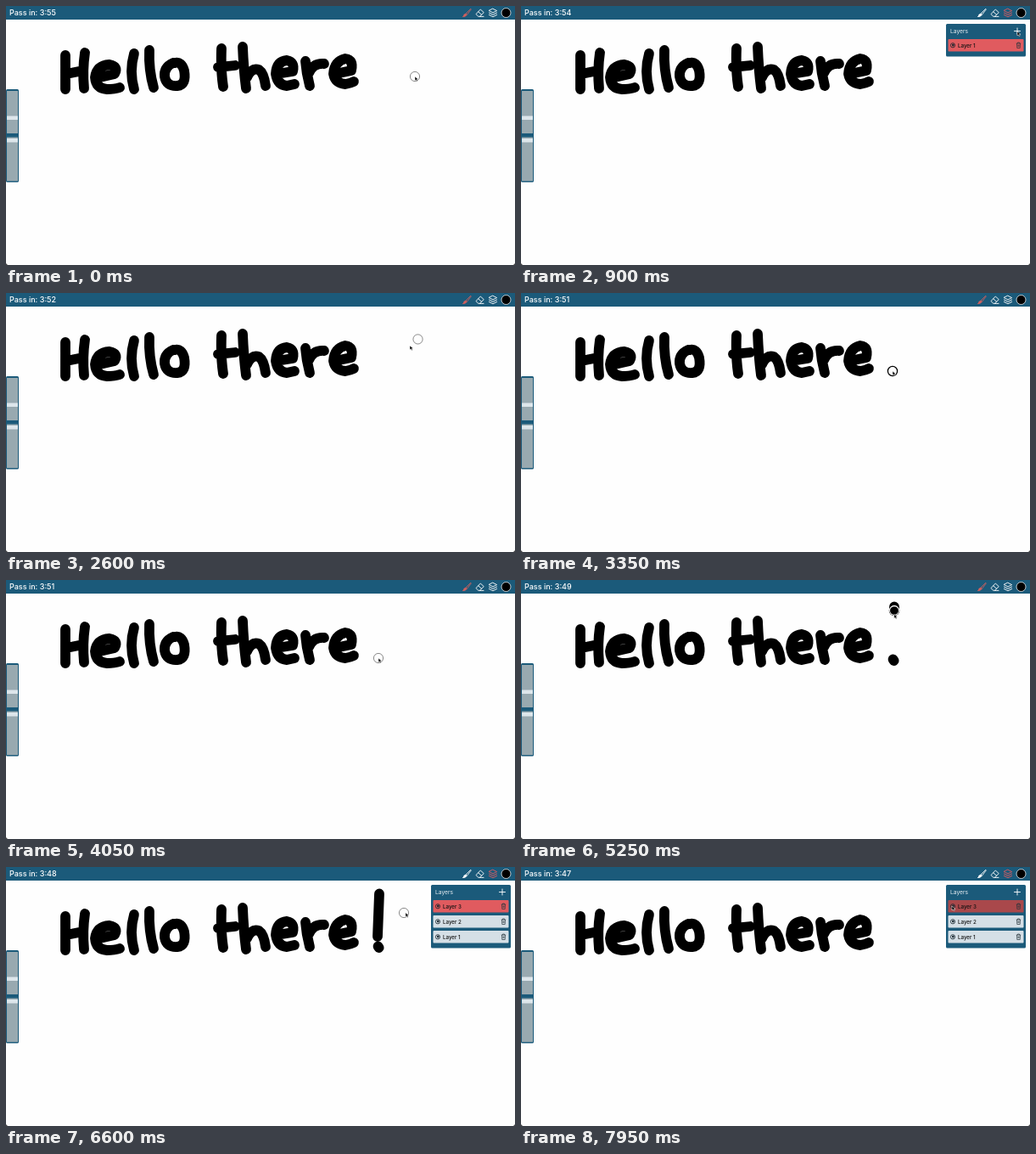
Animation of 600 by 305 pixels, one loop 8000 ms. Source, as an HTML page:

```html
<!DOCTYPE html>
<html lang="en">
<head>
<meta charset="utf-8">
<title>Drawing with layers</title>
<style>
html, body { margin: 0; width: 100%; height: 100%; overflow: hidden; background: #fefefe; }
svg { display: block; width: 100%; height: 100%; font-family: Inter, Roboto, sans-serif; font-weight: 500; }
.ink { fill: none; stroke: #000; stroke-width: 11.8; stroke-linecap: round; stroke-linejoin: round; }
.icon { fill: none; stroke: currentColor; stroke-width: .9; stroke-linecap: round; stroke-linejoin: round; color: #fff; }
#ring { fill: none; stroke: #fff; mix-blend-mode: difference; }
</style>
</head>
<body>
<svg viewBox="0 0 600 305">
  <rect width="600" height="305" fill="#fefefe"/>
  <path d="M0 303v2h2zM600 303v2h-2z" fill="#444"/>

  <g class="ink">
    <path d="M70 58L70 98M93 55Q90 76 92 97M71 80L91 76"/>
    <path d="M106 85L128 80Q133 71 122 69Q107 70 105 84Q106 97 119 98Q128 98 134 96"/>
    <path d="M151 56Q145 77 151 98M169 52Q168 75 174 96"/>
    <path d="M197 67Q186 72 187 83Q189 95 202 94Q213 93 210 76Q207 65 199 67"/>
    <path d="M254 50Q253 75 256 95M250 72L270 70"/>
    <path d="M279 48Q280 74 283 97M284 84Q290 72 298 75Q304 79 306 94"/>
    <path d="M319 80L338 77Q341 66 331 64Q319 65 318 80Q320 93 331 94L340 92"/>
    <path d="M353 65Q354 79 358 94M357 79Q362 67 375 68"/>
    <path d="M388 80L407 76Q410 63 400 62Q387 65 386 80Q388 91 400 92Q406 91 410 89"/>
  </g>

  <g class="ink" id="mark">
    <path id="dot" d="M438.6 93.5L439.6 95"/>
    <path id="bar"/>
  </g>
  <circle id="ring" r="5.6"/>

  <rect y="98" width="15" height="109.500" rx="1.500" fill="#1b5a7a"/>
  <path d="M1 100H14V150H1zM1 154.500H14V206H1z" fill="#98a9b0"/>
  <path d="M1 129.500H14V134H1zM1 156H14V160.500H1z" fill="#dde6eb"/>

  <rect width="600" height="16" fill="#1b5a7a"/>
  <text id="timer" x="4" y="11.300" font-size="9" fill="#fff"></text>
  <g id="brush" class="icon">
    <path d="M547.500 3.500L541.800 9.200L543.200 10.500L547.900 4.500z"/>
    <path d="M541.800 9.500Q539.500 9.300 539.500 11.500L538.400 12.500Q542 13 543 10.600z" fill="currentColor"/>
  </g>
  <path class="icon" d="M554.500 9L559.300 4L563.200 7.600L558.600 12.300H556.800L554.300 9.900zM556.800 6.800L560.700 10.400M558.500 12.400H563"/>
  <path id="stack" class="icon" d="M574 3.300L578.600 5.600L574 7.900L569.400 5.600zM569.400 8L574 10.300L578.600 8M569.400 10.400L574 12.700L578.600 10.400"/>
  <circle cx="589.500" cy="8" r="5.500" fill="#000" stroke="#e8eef2" stroke-width=".8"/>

  <g id="panel">
    <rect id="back" x="501" y="21" width="94" rx="1.500" fill="#1b5a7a"/>
    <text x="506" y="32.300" font-size="6.700" font-weight="400" fill="#e8eef2">Layers</text>
    <path class="icon" d="M581.500 29.500H588.500M585 26V33"/>
  </g>
  <path id="arrow" d="M0 0V5L1.300 3.900L2.200 5.700L3.200 5.200L2.400 3.500L4 3.400z" fill="#000" stroke="#fff" stroke-width=".5"/>
</svg>
<script>
const $ = id => document.getElementById(id);
const LOOP = 8000, RED = '#e05b5f', LAG = 50;

// Pointer path: time, x, y
const path = [
  [0, 482, 83], [80, 482, 83], [750, 585, 30], [1500, 585, 30], [1900, 549, 22],
  [1960, 544, 23], [2120, 543, 9], [2300, 543, 9], [2850, 438, 92], [3500, 438, 92],
  [3700, 439, 92], [4600, 439, 92], [5050, 440, 31], [5180, 440, 31], [5250, 440, 36],
  [5800, 438, 82], [6050, 438, 82], [6600, 469, 54], [7400, 499, 50], [7600, 508, 46],
  [8100, 508, 46]
];

function pointer(t) {
  const i = path.findIndex(p => p[0] > t);
  const [t0, x0, y0] = path[i - 1], [t1, x1, y1] = path[i];
  const k = (t - t0) / (t1 - t0);
  return [x0 + (x1 - x0) * k, y0 + (y1 - y0) * k];
}

const rows = [1, 2, 3].map(n => {
  const g = document.createElementNS('http://www.w3.org/2000/svg', 'g');
  g.innerHTML = `<rect x="503.500" width="89" height="14.500" rx="1"/>
    <circle cx="509" cy="7.300" r="2.600" fill="none" stroke="#15242c" stroke-width=".8"/>
    <circle cx="509.300" cy="7.100" r="1.300" fill="#15242c"/>
    <text x="515" y="9.500" font-size="6.200" fill="#111">Layer ${n}</text>
    <path d="M583.800 5H589.200M585.500 5V4H587.500V5M584.500 5L584.800 10.500H588.200L588.500 5M586 6.500V9M587 6.500V9"
      fill="none" stroke="#26343c" stroke-width=".7"/>`;
  $('panel').append(g);
  return g;
});

const show = (el, on) => el.style.display = on ? '' : 'none';
const within = (t, a, b) => t >= a && t < b;

function draw(t) {
  const [x, y] = pointer(t), [ax, ay] = pointer(t + LAG);
  const open = within(t, 100, 2200) || t >= 6600;
  const count = t < 950 ? 1 : t < 1350 ? 2 : 3;
  const pressed = within(t, 3300, 3500) || within(t, 4400, 4550) || within(t, 5180, 5800);

  $('timer').textContent = 'Pass in: 3:' + (55 - Math.floor((t + 850) / 1000));
  $('brush').style.color = open ? '#fff' : '#d0605f';
  $('stack').style.color = open ? RED : '#fff';

  show($('panel'), open);
  $('back').setAttribute('height', 20.5 + 18 * count);
  rows.forEach((row, i) => {
    const top = 39 + 18 * (count - 1 - i);
    const hover = ax > 503 && ax < 593 && ay > top && ay < top + 14.5;
    show(row, i < count);
    row.setAttribute('transform', `translate(0 ${top})`);
    row.firstChild.setAttribute('fill', i < count - 1 ? '#d5dfe6' : hover ? '#a9484b' : RED);
  });

  show($('mark'), t < 7750);
  show($('dot'), t >= 4400);
  show($('bar'), t >= 5180);
  const end = t < 5800 ? [x, y] : [438, 82];
  $('bar').setAttribute('d', `M440 31.500L${end}`);

  $('ring').setAttribute('transform', `translate(${x} ${y})`);
  $('ring').setAttribute('stroke-width', pressed ? 1.3 : 0.7);
  $('ring').setAttribute('stroke-opacity', pressed ? 1 : 0.65);
  $('arrow').setAttribute('transform', `translate(${ax} ${ay})`);
}

const start = performance.now();
function tick(now) {
  draw(Math.max(0, now - start) % LOOP);
  requestAnimationFrame(tick);
}
draw(0);
requestAnimationFrame(tick);
</script>
</body>
</html>
```
